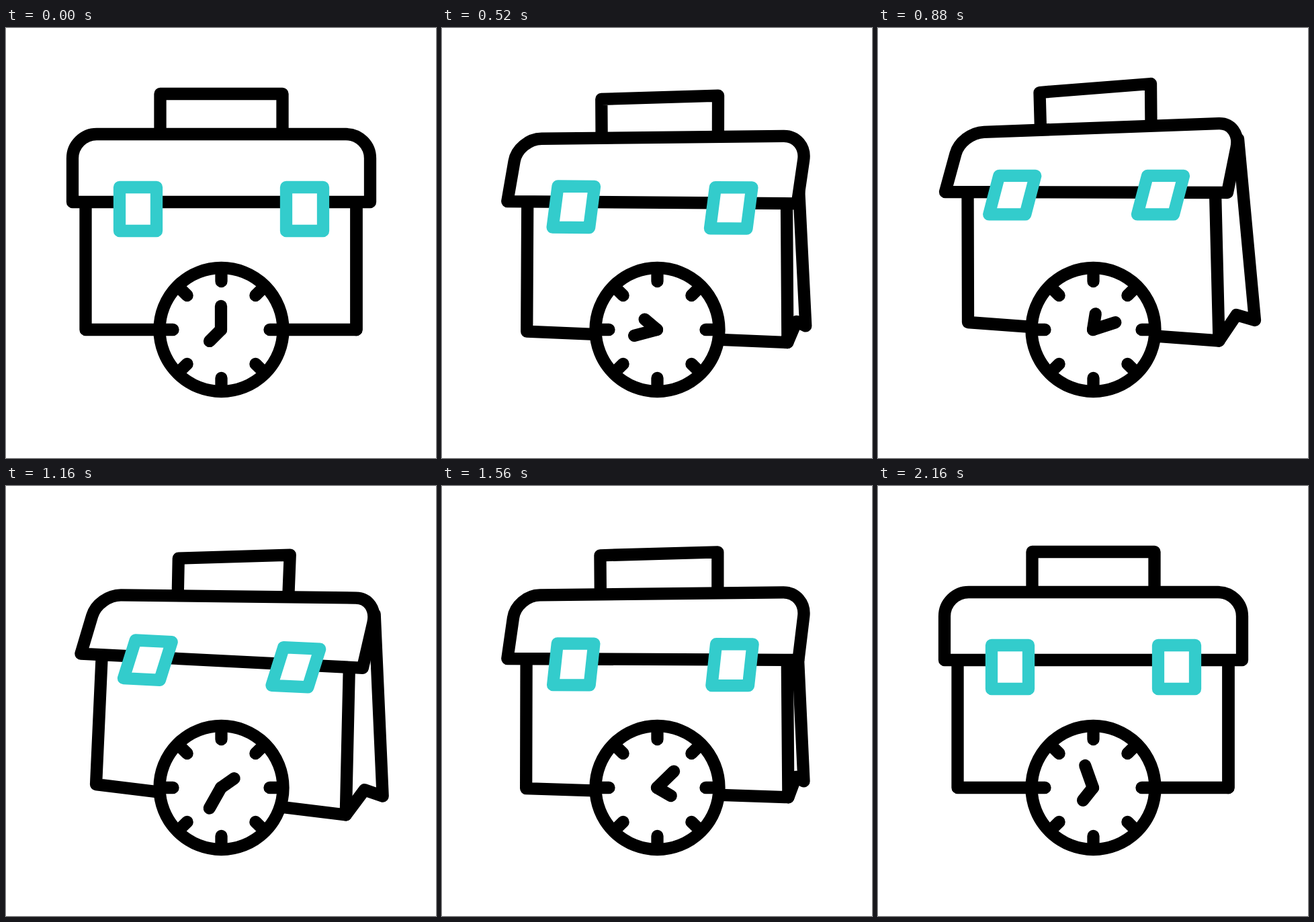
An HTML page that plays this animation: 640x640 px, repeating every 2200 ms.

```html
<!DOCTYPE html>
<html lang="en">
<head>
<meta charset="utf-8">
<title>Briefcase and clock</title>
<style>
  html, body { margin: 0; width: 100%; height: 100%; overflow: hidden; background: #fff; }
  svg { display: block; width: 100vw; height: 100vh; }
  .ink { stroke: #000; stroke-width: 18.3; stroke-linecap: round; stroke-linejoin: round; fill: none; }
  .paper { fill: #fff; }
  .latch { stroke: #33cccc; }
</style>
</head>
<body>
<svg viewBox="0 0 640 640">
  <g id="bag" class="ink">
    <path id="side"/>
    <path id="body"/>
    <path id="handle"/>
    <path id="lid" class="paper"/>
    <path id="latches" class="paper latch"/>
  </g>
  <g class="ink">
    <circle class="paper" cx="320.5" cy="449" r="92"/>
    <path id="ticks"/>
    <path id="minute" d="M320 449V414"/>
    <path id="hour" d="M320 449V425"/>
  </g>
</svg>
<script>
const LOOP = 2200, STEP = 40;
const $ = id => document.getElementById(id);
const lerp = (a, b, k) => a + (b - a) * k;
const mix = (p, q, k) => p.map((v, i) => lerp(v, q[i], k));

// Key poses: the bag turns, tilts and hops while its flap swings behind.
const POSES = [
  { t: 0,    turn: 0,    tilt: 0,    hop: 0,   swing: 0 },
  { t: 320,  turn: 0,    tilt: 2.85, hop: 4,   swing: 0 },
  { t: 720,  turn: 1,    tilt: -2.1, hop: 0,   swing: 1 },
  { t: 880,  turn: 1,    tilt: 0,    hop: -15, swing: 0 },
  { t: 1160, turn: 1,    tilt: 2.75, hop: 0,   swing: -0.3 },
  { t: 1560, turn: 0.43, tilt: 0.2,  hop: 0,   swing: 0.4 },
  { t: 1680, turn: 0,    tilt: 0,    hop: 0,   swing: 0 },
  { t: LOOP, turn: 0,    tilt: 0,    hop: 0,   swing: 0 }
];

function poseAt(t) {
  const i = POSES.findIndex(p => p.t > t), a = POSES[i - 1], b = POSES[i];
  const k = (t - a.t) / (b.t - a.t), pose = {};
  for (const key in a) pose[key] = lerp(a[key], b[key], k);
  return pose;
}

// Corners run clockwise from the top left.
const rect = (x0, y0, x1, y1) => [[x0, y0], [x1, y0], [x1, y1], [x0, y1]];
const BODY = rect(118.5, 259, 521.5, 449);
const BODY_TURNED = [[133.5, 259], [502, 259], [507.5, 480.5], [134, 453]];
const HANDLE = rect(229.5, 98, 411.5, 158);
const HANDLE_TURNED = [[240.5, 111], [406, 98], [406.5, 157], [242, 165]];
const LID = rect(99, 158, 542, 259);
const LID_TURNED = [[124, 171], [541, 156], [520, 260], [100, 259]];
const FOLD = [[536, 180], [561, 450], [533.5, 442]];

const blend = (front, turned, k) => front.map((p, i) => mix(p, turned[i], k));
const line = points => "M" + points.join("L");

function lidPath([tl, tr, br, bl]) {
  const at = (u, v) => mix(mix(tl, tr, u), mix(bl, br, u), v);
  const u = 36 / 443, v = 36 / 101, c = 0.45;
  return `M${bl}L${at(0, v)}C${at(0, v * c)} ${at(u * c, 0)} ${at(u, 0)}` +
    `L${at(1 - u, 0)}C${at(1 - u * c, 0)} ${at(1, v * c)} ${at(1, v)}L${br}Z`;
}

function latchPath(x, turnedX, k, [dx, dy]) {
  const cx = lerp(x, turnedX, k) + dx, cy = lerp(269.5, 263.7, k) + dy;
  const w = lerp(55, 54, k) / 2, h = lerp(65, 57.5, k) / 2, lean = 7.5 * k;
  return line([
    [cx - w + lean, cy - h], [cx + w + lean, cy - h],
    [cx + w - lean, cy + h], [cx - w - lean, cy + h]
  ]) + "Z";
}

function draw(t) {
  const { turn, tilt, hop, swing } = poseAt(t);
  const set = (id, d) => $(id).setAttribute("d", d);
  const drift = [-7 * swing, -3 * swing];

  const [tl, tr, br, bl] = blend(BODY, BODY_TURNED, turn);
  set("body", line([tl, bl, br, tr]));

  const folded = [259, 430, 425].map(y => [BODY[1][0], y]);
  set("side", line([...blend(folded, FOLD, turn), br]));

  const [h0, h1, h2, h3] = blend(HANDLE, HANDLE_TURNED, turn);
  set("handle", line([h3, h0, h1, h2]));

  const lid = blend(LID, LID_TURNED, turn);
  for (const corner of lid.slice(2)) {
    corner[0] += drift[0];
    corner[1] += drift[1];
  }
  set("lid", lidPath(lid));
  set("latches", latchPath(196.5, 199.75, turn, drift) + latchPath(444.5, 420.5, turn, drift));
  $("bag").setAttribute("transform", `translate(0 ${hop}) rotate(${tilt} 320 449)`);

  const spin = t / LOOP * 360;
  $("minute").setAttribute("transform", `rotate(${spin * 3} 320 449)`);
  $("hour").setAttribute("transform", `rotate(${225 + spin} 320 449)`);
}

let ticks = "";
for (let i = 0; i < 8; i++) {
  const a = i * Math.PI / 4;
  ticks += line([72, 90].map(r => [320.5 + r * Math.cos(a), 449 + r * Math.sin(a)]));
}
$("ticks").setAttribute("d", ticks);

const start = performance.now();
function tick() {
  const t = (performance.now() - start) % LOOP;
  draw(Math.floor(t / STEP) * STEP);
  requestAnimationFrame(tick);
}
tick();
</script>
</body>
</html>
```
